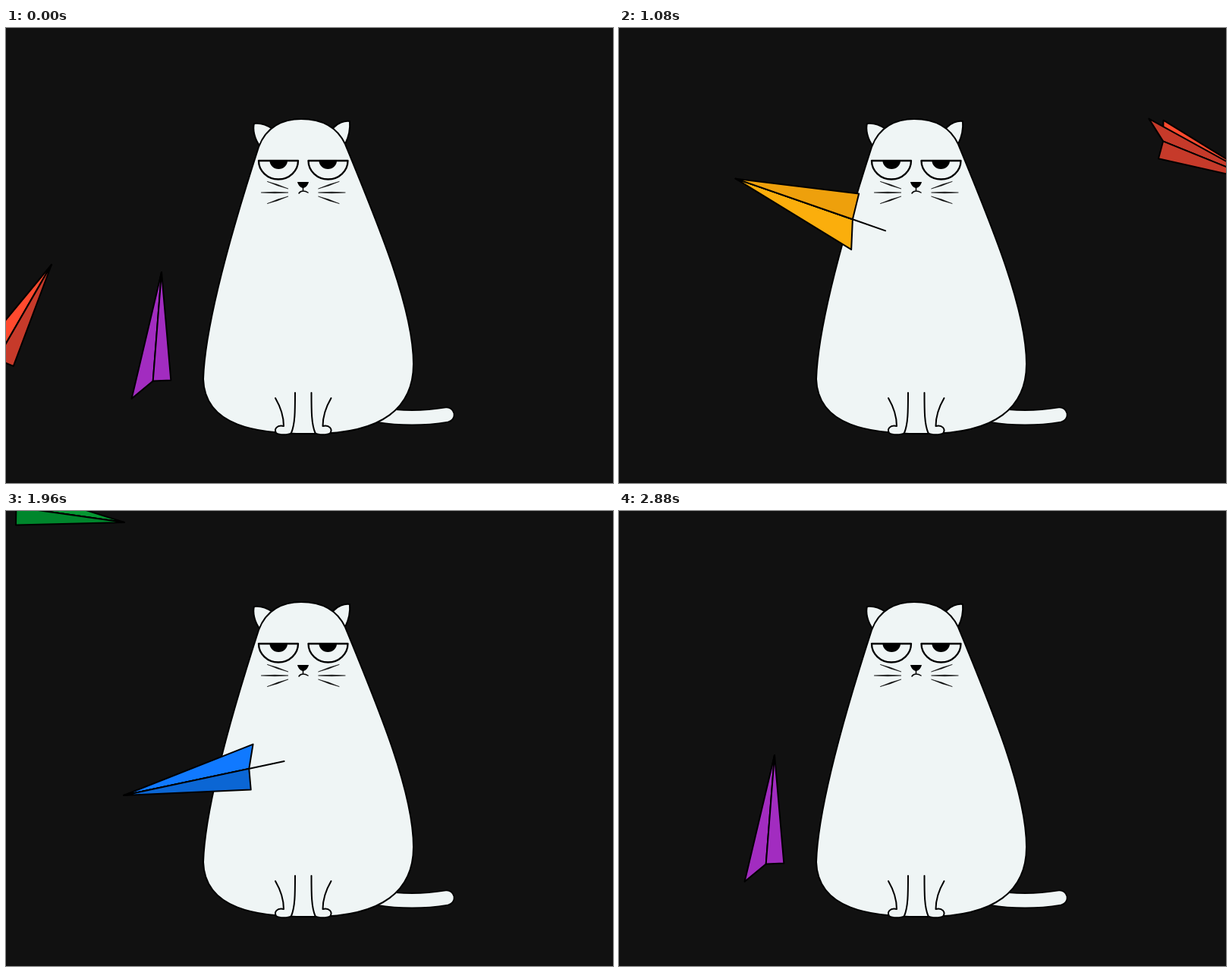
These frames come from a looping animation (800 by 600 pixels, 2.92 s). An HTML page with a canvas:

```html
<!DOCTYPE html>
<html lang="en">
<head>
<meta charset="utf-8">
<title>Cat and paper planes</title>
<style>
html, body { margin: 0; width: 100%; height: 100%; overflow: hidden; background: #111; }
canvas { display: block; width: 800px; height: 600px; }
</style>
</head>
<body>
<canvas id="stage" width="800" height="600"></canvas>
<script>
const ctx = document.getElementById('stage').getContext('2d');
const LOOP = 2920, STEP = 40, MID = 391.75;
const FUR = '#eff5f5', INK = '#000';

// Each path point: time, nose x, nose y, heading in degrees, roll.
const red = {
  light: '#ff4a2e', dark: '#c63a2a',
  path: [
    [0, 60, 312, -60, 0], [240, 205, 115, -42, 0], [440, 358, 47, -22, 0],
    [640, 425, 48, -4, 0.5], [840, 490, 74, 12.5, 1], [1160, 980, 250, 25, 1]
  ]
};
const yellow = {
  light: '#fbae0c', dark: '#eea00c', spread: 1.3,
  size: t => 264 * Math.exp((840 - t) / 500),
  blur: t => Math.max(0, 5 - (t - 840) / 48),
  path: [
    [720, 900, 760, -123, 0], [840, 690, 500, -122, 0],
    [1000, 380, 235, -148, 0], [1200, -220, 190, -180, 0]
  ]
};
const blue = {
  light: '#1079ff', dark: '#0b66d4', frontFrom: 1580,
  size: t => 103 * Math.exp((t - 1440) / 1050),
  side: t => Math.tanh((1600 - t) / 40),
  path: [
    [1280, -60, 62, 12, 0], [1440, 336, 135, 12, 0], [1600, 790, 285, 92, 0],
    [1680, 480, 320, 170, 0], [1960, 155, 375, 168, 0], [2440, -230, 472, 162, -1],
    [2720, -480, 550, 162, -1]
  ]
};
const green = {
  light: '#069632', dark: '#00862c',
  path: [
    [1880, 20, -4, 8, 0], [1960, 156, 15, 8, 0], [2200, 388, 58, 19, -0.5],
    [2440, 616, 241, 43, -1], [2760, 950, 570, 45, -1]
  ]
};
const purple = {
  light: '#d84cf5', dark: '#a22cc0',
  path: [
    [2240, -90, 180, 4, 1], [2440, 226, 204, 0, 1], [2640, 246, 222, -44, 1],
    [2880, 205, 322, -85.5, 1.3], [3200, 190, 620, -96, 1.3]
  ]
};
const planes = [red, yellow, blue, green, purple];

// Smooth curve through the path points.
function follow(rows, t) {
  let i = 0;
  while (i < rows.length - 2 && t >= rows[i + 1][0]) i++;
  const a = rows[i], b = rows[i + 1];
  const p = rows[i - 1] || a, n = rows[i + 2] || b;
  const d = b[0] - a[0], u = (t - a[0]) / d, u2 = u * u, u3 = u2 * u;
  return a.map((v, k) => {
    const m0 = (b[k] - p[k]) / (b[0] - p[0]) * d;
    const m1 = (n[k] - v) / (n[0] - a[0]) * d;
    return (2 * u3 - 3 * u2 + 1) * v + (u3 - 2 * u2 + u) * m0
      + (3 * u2 - 2 * u3) * b[k] + (u3 - u2) * m1;
  });
}

function drawFace(points, fill, edge = true) {
  ctx.beginPath();
  points.forEach(p => ctx.lineTo(...p));
  ctx.closePath();
  ctx.fillStyle = fill;
  ctx.fill();
  if (edge) ctx.stroke();
}

function drawPlane(plane, time, front) {
  const { path, light, dark, spread = 1 } = plane;
  // The loop's first picture repeats its last one.
  const t = time < path[0][0] ? time + LOOP - STEP : time;
  if (t > path[path.length - 1][0] || front !== (t >= (plane.frontFrom || 0))) return;

  const [, x, y, heading, roll] = follow(path, t);
  const size = plane.size ? plane.size(t) : 144;
  const side = (plane.side ? plane.side(t) : 1) * spread;
  const blur = plane.blur ? plane.blur(t) : 0;
  const angle = heading * Math.PI / 180;
  const c = Math.cos(angle) * size, s = Math.sin(angle) * size;
  const at = (back, out) => {
    const v = out * side;
    return [x - back * c - v * s, y - back * s + v * c];
  };

  // Rolling left opens the left wing and hides the right one.
  const under = Math.min(roll, 0), over = Math.max(roll - 1, 0);
  const nose = [x, y];
  const notch = at(1, 0);
  const left = at(1.07 - 0.07 * under, -0.18 + 0.1 * under + 0.1 * over);
  const keel = at(1.28 - 0.08 * Math.abs(roll), -0.14 * roll);
  const right = at(0.98 - 0.02 * under, 0.163 * Math.max(0, 1 + under));

  ctx.save();
  if (blur) ctx.filter = `blur(${blur}px)`;
  ctx.strokeStyle = INK;
  ctx.lineWidth = 2;
  if (blur) drawFace([nose, left, notch, right], light, false);
  drawFace([nose, left, notch], light);
  drawFace([nose, keel, notch], roll > 0 ? dark : light);
  drawFace([nose, notch, right], dark);
  ctx.restore();
}

const shape = d => new Path2D(d);
const ears = shape('M335 156C327 146 325 133 327 126C335 125 344 128 351 133L345 150Z' +
  'M431 132C437 125 446 122 453 123C454 134 451 145 447 153L435 150Z');
const body = shape('M260 463C262 400 290 290 333 157C343 130 365 120 389 120' +
  'C415 120 436 130 447 153C491 260 537 370 537 443C537 500 497 535 405 535' +
  'C330 536 262 525 260 463Z');
const eye = shape('M333 175H385A26 24.5 0 0 1 333 175Z');
const pupil = shape('M347.5 175H371A11.7 11 0 0 1 347.5 175Z');
const leg = shape('M355 488C362 500 366 513 366 525C357 523 353 529 356 534' +
  'C360 537 372 537 376 534C381 522 381 505 381 481');
const paw = shape('M366 525C357 523 353 529 356 534C360 537 372 537 376 534L378 524Z');
const nose = shape('M384 203H399C398 207 395 211 391.5 211C388 211 385 207 384 203Z');
const mouth = shape('M391.5 210V215M386 218Q388 215 391.5 215Q395 215 398 217');

function outlined(path, width = 2) {
  ctx.fillStyle = FUR;
  ctx.fill(path);
  ctx.lineWidth = width;
  ctx.stroke(path);
}

function drawTail(t) {
  const lift = t > 80 && t < 840 ? Math.sin(Math.PI * (t - 80) / 760) ** 2 : 0;
  const mix = (a, b) => a + (b - a) * lift;
  ctx.beginPath();
  ctx.moveTo(490, 510);
  ctx.bezierCurveTo(mix(520, 555), mix(515, 528), mix(550, 530), mix(515, 490),
    mix(581, 571), mix(510, 492));
  for (const [color, width] of [[INK, 21], [FUR, 17.5]]) {
    ctx.strokeStyle = color;
    ctx.lineWidth = width;
    ctx.stroke();
  }
}

function drawHalf() {
  ctx.fillStyle = FUR;
  ctx.fill(paw);
  ctx.lineWidth = 2;
  ctx.stroke(leg);
  outlined(eye, 2.3);
  ctx.fillStyle = INK;
  ctx.fill(pupil);
  ctx.lineWidth = 0.5;
  for (const k of [-1, 0, 1]) {
    const x1 = k ? 344.5 : 336.5, y1 = 217 + 14.5 * k;
    const x2 = 372, y2 = 217 + 5 * k;
    const mx = (x1 + x2) / 2, my = (y1 + y2) / 2;
    ctx.beginPath();
    ctx.moveTo(x1, y1);
    ctx.quadraticCurveTo(mx, my - 1.6, x2, y2);
    ctx.quadraticCurveTo(mx, my + 1.6, x1, y1);
    ctx.fill();
    ctx.stroke();
  }
}

function drawCat(t) {
  drawTail(t);
  ctx.strokeStyle = INK;
  outlined(ears);
  outlined(body);
  drawHalf();
  ctx.save();
  ctx.translate(2 * MID, 0);
  ctx.scale(-1, 1);
  drawHalf();
  ctx.restore();
  ctx.fill(nose);
  ctx.lineWidth = 1.5;
  ctx.stroke(mouth);
}

function draw(t) {
  ctx.fillStyle = '#111';
  ctx.fillRect(0, 0, 800, 600);
  ctx.lineCap = ctx.lineJoin = 'round';
  planes.forEach(p => drawPlane(p, t, false));
  drawCat(t);
  planes.forEach(p => drawPlane(p, t, true));
}

const start = performance.now();
function tick() {
  const t = (performance.now() - start) % LOOP;
  draw(Math.floor(t / STEP) * STEP);
  requestAnimationFrame(tick);
}
tick();
</script>
</body>
</html>
```
